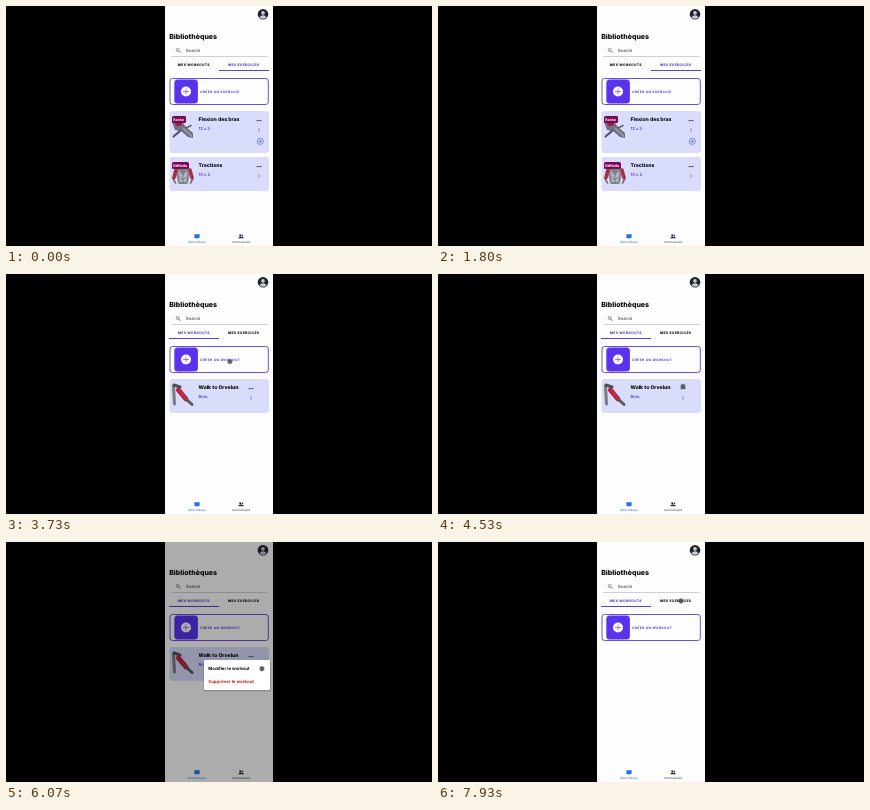
These frames come from a looping animation (426x240 px, 8 s). An HTML page:

```html
<!DOCTYPE html>
<html lang="fr">
<head>
<meta charset="utf-8">
<title>Bibliothèques</title>
<style>
  html, body { margin: 0; width: 100%; height: 100%; overflow: hidden; background: #000; }
  svg { display: block; width: 100vw; height: 100vh; }
  text { font-family: Inter, "Open Sans", sans-serif; font-weight: 700; fill: #080808; text-rendering: geometricPrecision; }
  .heading { font-size: 7px; font-weight: 800; }
  .name { font-size: 5.1px; font-weight: 800; }
  .detail { font-size: 4.1px; font-weight: 600; fill: #5b3ae8; }
  .tab { font-size: 3.4px; font-weight: 800; letter-spacing: .29px; }
  .create { font-size: 3.2px; letter-spacing: .42px; fill: #5436c8; }
  .badge { font-size: 3.6px; font-weight: 800; fill: #fff; }
  .nav { font-size: 2.9px; font-weight: 500; text-anchor: middle; }
  .menu { font-size: 4.35px; }
  .line { fill: none; stroke-linecap: round; stroke-linejoin: round; }
</style>
</head>
<body>
<svg id="stage" viewBox="0 0 426 240"></svg>
<script>
const LOOP = 8000;
const TAB_SWITCH = 3150, MENU_OPEN = 4750, MENU_CLOSE = 6450, CARD_REMOVED = 7050;

// Pointer stops: time, x, y
const pointerPath = [
  [2550, 222, 88], [2880, 198, 57], [3250, 198, 57], [4150, 245, 112.5],
  [4900, 245, 112.5], [5400, 263.5, 116], [5800, 263.5, 116],
  [6350, 248, 138], [6850, 248, 138], [7700, 243, 59], [LOOP, 243, 59]
];

const text = (x, y, kind, value, attrs = '') =>
  `<text x="${x}" y="${y}" class="${kind}" ${attrs}>${value}</text>`;
const rect = (x, y, w, h, r, fill, attrs = '') =>
  `<rect x="${x}" y="${y}" width="${w}" height="${h}" rx="${r}" fill="${fill}" ${attrs}/>`;
const circle = (x, y, r, fill, attrs = '') =>
  `<circle cx="${x}" cy="${y}" r="${r}" fill="${fill}" ${attrs}/>`;
const line = (d, color, width) =>
  `<path class="line" d="${d}" stroke="${color}" stroke-width="${width}"/>`;
const shape = (d, fill) => `<path d="${d}" fill="${fill}"/>`;

const badge = (y, width, label) =>
  rect(166, y, width, 7, 1.5, '#800653') + text(167.3, y + 4.9, 'badge', label);

const card = (y, height, title, detail, iconX, picture) =>
  rect(163.5, y, 99.5, height, 3, '#d9dcfb') + picture +
  text(192.6, y + 9.8, 'name', title) +
  text(192.6, y + 18.6, 'detail', detail) +
  [-1.8, 0, 1.8].map(dx => circle(iconX + dx, y + 9.6, .7, '#222')).join('') +
  line(`M${iconX - .7} ${y + 17.3}l1.5 1.7l-1.5 1.7`, '#6b52dc', .6);

const bentArm =
  shape('M166 116L174 113L180 121L187 127V132L182 131L175 125L169 124Z', '#6f727d') +
  shape('M168 116L175 114L176 119L171 120Z', '#a01c45') +
  line('M167.5 130.5L174 125', '#4c5060', 2) +
  line('M177 122L185.5 130', '#a3a6b0', 1.2) +
  line('M180 122L185 119.5', '#60636f', 1.6);

const back =
  shape('M171 162Q177 157 183 162L184 168L181.5 178H172.5L170 168Z', '#858893') +
  line('M170 164L167.8 172M184 164L186.2 172', '#a82a44', 3.4) +
  line('M167.5 173.5L169.5 177M186.5 173.5L184.5 177', '#6d707c', 1.6) +
  shape('M172.5 165L177 169L181.5 165L180 176H174Z', '#b4b7c0') +
  line('M177 164V177M174 171L177 174L180 171', '#646873', .7) +
  circle(177, 160.5, 2.2, '#777b85');

const stretchedArm =
  line('M167.5 112L168.5 130', '#777b86', 3) +
  line('M168 111L174 113', '#4c505c', 3) +
  line('M172.5 116L180 125', '#b71f3d', 5) +
  line('M180 125L186 130.5', '#565a67', 3) +
  line('M173 116L179.5 124', '#d0526a', .7);

const phone =
  rect(159, 0, 108, 240, 0, '#fdfdfe') +
  circle(257, 8.2, 5.3, '#20242d') +
  circle(257, 6.9, 1.8, '#c9ccd2') +
  shape('M253.7 11.7Q254 9.2 257 9.2T260.3 11.7Q257 14 253.7 11.7Z', '#c9ccd2') +
  text(163.2, 32.7, 'heading', 'Bibliothèques') +
  circle(171.7, 44, 1.5, 'none', 'stroke="#555" stroke-width=".6"') +
  line('M173 45.3L174.3 46.6', '#555', .7) +
  text(179.8, 46, '', 'Search', 'style="font-size:4.3px;font-weight:500;fill:#444"') +
  line('M165.5 50.5H261', '#bcbcc4', .7) +
  text(171.8, 59.8, 'tab', 'MES WORKOUTS', 'id="workoutTab"') +
  text(222, 59.8, 'tab', 'MES EXERCICES', 'id="exerciseTab"') +
  rect(163, 64, 50, 1, 0, '#5a43cf', 'id="underline"') +
  rect(164, 72.5, 98.3, 26, 2.5, '#fdfdfe', 'stroke="#6a51d8" stroke-width="1"') +
  rect(168.3, 73.6, 23.6, 23.8, 3.5, '#5933ee') +
  circle(180, 85.5, 5, '#fff') +
  line('M177.5 85.5H182.5M180 83V88', '#7a62dc', .8) +
  text(194, 86.8, 'create', '', 'id="createLabel"');

const exercises =
  card(105, 42, 'Flexion des bras', '12 x 3', 253, bentArm + badge(110, 14, 'Facile')) +
  circle(254.3, 135.3, 3.1, 'none', 'stroke="#5f7fbe" stroke-width=".8"') +
  line('M252.8 135.3H255.8M254.3 133.8V136.8', '#5f7fbe', .8) +
  card(151, 34, 'Tractions', '10 x 2', 253, back + badge(156, 17, 'Difficile'));

const navigation =
  shape('M188.4 228.2Q190 227.7 191 228.6Q192 227.7 193.6 228.2V232Q192 231.7 191 232.5Q190 231.7 188.4 232Z', '#2472e8') +
  text(191, 236.9, 'nav', 'Bibliothèque', 'style="fill:#4c82d8"') +
  circle(234.2, 229.2, 1, '#222b42') + circle(236.4, 229.4, .8, '#222b42') +
  shape('M232.3 232.3Q232.4 230.6 234.2 230.6Q235.5 230.5 236.5 230.8Q237.8 231 237.8 232.3Z', '#222b42') +
  text(235, 236.9, 'nav', 'Communauté', 'style="fill:#555"');

const menu =
  rect(159, 0, 108, 240, 0, '#000', 'opacity=".32"') +
  rect(197.5, 118.7, 67.3, 30.6, 1.5, '#000', 'opacity=".2"') +
  rect(198, 118, 66, 30, 1, '#fff') +
  text(202.3, 128.4, 'menu', 'Modifier le workout') +
  text(202.3, 140.5, 'menu', 'Supprimer le workout', 'style="fill:#d3201c"');

const group = (id, content) => `<g id="${id}">${content}</g>`;
document.getElementById('stage').innerHTML =
  phone + group('exercises', exercises) +
  group('workout', card(105, 34, 'Walk to Orvelun', 'Bras', 245, stretchedArm)) +
  navigation + group('menu', menu) +
  circle(0, 0, 2.4, '#42444c', 'id="pointer" stroke="#777" stroke-width=".4"');

const parts = Object.fromEntries(
  ['exercises', 'workout', 'menu', 'pointer', 'underline', 'workoutTab', 'exerciseTab', 'createLabel']
    .map(id => [id, document.getElementById(id)]));

const clamp = v => Math.max(0, Math.min(1, v));
const ease = v => v * v * (3 - 2 * v);
const progress = (t, start, duration) => ease(clamp((t - start) / duration));
const show = (part, visible) => part.style.display = visible ? '' : 'none';

function pointerAt(t) {
  const next = pointerPath.findIndex(stop => stop[0] > t);
  const [t0, x0, y0] = pointerPath[Math.max(0, next - 1)];
  const [t1, x1, y1] = pointerPath[next];
  const p = t1 > t0 ? progress(t, t0, t1 - t0) : 0;
  return [x0 + (x1 - x0) * p, y0 + (y1 - y0) * p];
}

function draw(t) {
  const onWorkouts = t >= TAB_SWITCH;
  show(parts.exercises, !onWorkouts);
  show(parts.workout, onWorkouts && t < CARD_REMOVED);
  parts.workoutTab.style.fill = onWorkouts ? '#5a43cf' : '#111';
  parts.exerciseTab.style.fill = onWorkouts ? '#111' : '#5a43cf';
  parts.createLabel.textContent = onWorkouts ? 'CRÉER UN WORKOUT' : 'CRÉER UN EXERCICE';
  parts.underline.setAttribute('x', 213 - 50 * progress(t, TAB_SWITCH, 250));
  parts.menu.style.opacity = progress(t, MENU_OPEN, 150) - progress(t, MENU_CLOSE, 150);

  const [x, y] = pointerAt(t);
  parts.pointer.setAttribute('cx', x);
  parts.pointer.setAttribute('cy', y);
  parts.pointer.style.opacity = .85 * progress(t, 2550, 150);
}

const start = performance.now();
function tick() {
  draw((performance.now() - start) % LOOP);
  requestAnimationFrame(tick);
}
tick();
</script>
</body>
</html>
```
